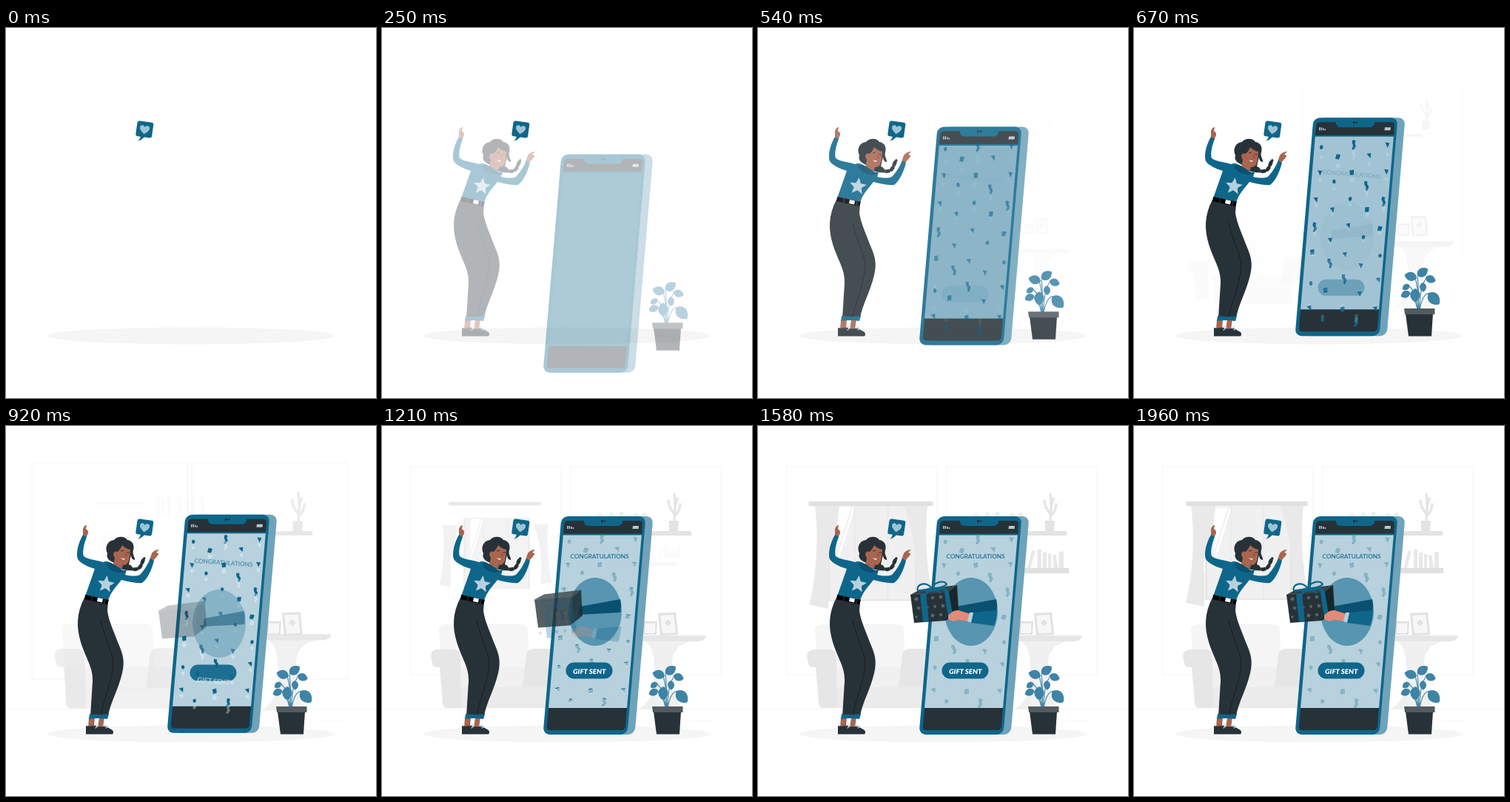
Recreate the animation shown at these times as an HTML page. Size 500x500 px, loop 2000 ms.

```html
<!DOCTYPE html>
<html lang="en">
<head>
<meta charset="utf-8">
<title>Gift sent</title>
<style>
html, body { margin: 0; width: 100%; height: 100%; overflow: hidden; background: #fff; }
svg { display: block; width: 100vw; height: 100vh; }
[data-pop], [data-rise] { transform-box: fill-box; transform-origin: center; }
text { font-family: Lato, Inter, sans-serif; text-anchor: middle; }
#darkBits { transform-origin: 0 100px; }
.teal { fill: #0e668b; }
.dark { fill: #263238; }
.skin { fill: #a8654f; }
.pale { fill: #b7d1dd; }
.line { fill: none; stroke-linecap: round; stroke-linejoin: round; }
</style>
</head>
<body>
<svg viewBox="0 0 500 500">
  <defs>
    <path id="leaf" d="M0 0C-9 -4 -7 -13 0 -17C7 -13 9 -4 0 0Z"/>
    <path id="star"/>
    <path id="dot" d="M-2.200 0A2.200 2.600 0 1 1 2.200 0A2.200 2.600 0 1 1 -2.200 0Z"/>
    <path id="tri" d="M-3 -2.500L3 -3L1.500 3.500Z"/>
    <path id="square" d="M-2.500 -3H3L2 3H-3Z"/>
    <path id="squiggle" d="M-2 -6L2 -5Q0 -2 3 1Q3 4 0 7L-2 5Q0 3 -1 1Q-4 -2 -2 -6Z"/>
  </defs>

  <!-- room: data-pop = start, fade delay -->
  <path d="M0 382.500H500M415 398.500H448" data-pop="6" stroke="#f2f2f2" stroke-width=".7"/>
  <rect data-pop="5.500" x="39" y="55" width="203" height="282" fill="none" stroke="#f5f5f5"/>
  <rect data-pop="5.500" x="255" y="55" width="203" height="282" fill="none" stroke="#f5f5f5"/>

  <g data-pop="20 0">
    <path d="M96 109H214V235H96Z" fill="#e6e6e6"/>
    <path d="M99 110H211V233H99Z" fill="#f0f0f0"/>
    <path d="M111 110H127L108 170V122ZM129 110H132L109 185V174Z" fill="#fff"/>
    <path d="M131 110V233M175 110V233" stroke="#e8e8e8" stroke-width="1.500"/>
  </g>
  <path data-pop="22 0" d="M77 108H109C108 150 91 165 95 200V244L70 239C79 205 83 150 77 108Z" fill="#e9e9e9"/>
  <path data-pop="22 0" d="M198 108H229C224 150 229 205 237 235L212 238C217 190 214 160 198 108Z" fill="#e9e9e9"/>
  <rect data-pop="20 0" x="70.500" y="102" width="164" height="6" rx="1" fill="#e0e0e0"/>

  <path data-pop="8" d="M77 276Q77 268 85 268H187Q197 268 197 277L200 355H84Z" fill="#f5f5f5"/>
  <g data-pop="8">
    <path d="M82 326H238V381H88Q83 381 82 375Z" fill="#f0f0f0"/>
    <path d="M84 353H238V381H88Z" fill="#ebebeb"/>
  </g>
  <path data-pop="8" d="M66 312Q66 302 76 302H95Q106 302 106 313L107 381H89Q83 381 82 375L78 326H73Q68 326 68 319Z" fill="#e6e6e6"/>
  <path data-pop="8" d="M195 310Q196 301 206 301H246V353H190Z" fill="#e6e6e6"/>

  <g data-pop="5">
    <path d="M354 290H423C400 294 393 304 391 325C390 358 396 376 412 383H345C362 376 369 358 368 325C367 306 365 296 354 290Z" fill="#f0f0f0"/>
    <path d="M338 283H438Q437 291 424 291H338Z" fill="#e6e6e6"/>
  </g>
  <g data-pop="5">
    <path d="M373 253L397 252L400 282L376 283ZM354 264H372L371 282H353Z" fill="#e0e0e0"/>
    <path d="M376 256L394.500 255L397 279.500L379 280.500ZM356 266.500H369.500L369 280H355Z" fill="#f7f7f7"/>
    <path d="M386 261L391 266L387 271L382 266Z" fill="#e3e3e3"/>
  </g>

  <path data-rise="20 8 -120 -30" fill="#ededed" d="M292 118H298V142H292ZM300 122H305V142H300ZM308 117H312V142H308ZM320 117L326 116L329 141L323 142ZM332 121H338V142H332ZM341 118H346V142H341ZM352 118L357 117L360 142H355Z"/>
  <rect data-pop="10 2" x="290" y="142" width="127" height="6" fill="#e3e3e3"/>
  <g data-pop="6.500">
    <path d="M388 128H401L400 142H388Z" fill="#e3e3e3"/>
    <path class="line" d="M395 128Q397 108 395 92M395 118Q388 112 387 101M395 122Q402 117 403 106M396 108Q399 103 399 98" stroke="#e6e6e6" stroke-width="3.500"/>
  </g>
  <g data-rise="26 8 0 -14">
    <rect data-pop="21 0" x="290" y="192" width="128" height="7" fill="#e0e0e0"/>
    <path data-pop="22 0" d="M365 190L371 168L375 169L369 192H365ZM378 167H383V192H378ZM385 171H390V192H385ZM392 173H396V192H392ZM398 175L402 174L405 192H399ZM406 170H412V192H406Z" fill="#e8e8e8"/>
  </g>

  <ellipse cx="250" cy="416" rx="194" ry="11.500" fill="#f5f5f5"/>

  <!-- phone -->
  <g id="phone">
    <g transform="matrix(1 0 -.0847 1 10.330 0)">
      <rect x="251" y="122" width="115.500" height="295" rx="9" fill="#6fa3ba"/>
      <rect class="teal" x="242.500" y="122" width="114" height="295" rx="9"/>
      <path class="dark" d="M247 145.500V133Q247 128 252 128H273Q275 135 280 135H320Q325 135 326 128H348Q353 128 353 133V145.500ZM247 381H353V406Q353 411 348 411H252Q247 411 247 406Z"/>
      <rect id="screen" class="pale" x="247" y="147.500" width="106" height="233.500"/>
    </g>
    <path class="dark" d="M296 127H299V130H296Z"/><circle class="dark" cx="301" cy="128.500" r="1.300"/>
    <path d="M250 135H251.500V139H250ZM252.500 135H254V139H252.500ZM255 136H256.500V139H255ZM257.500 137H259V139H257.500ZM339 135H347L346.500 139H338.500Z" fill="#b9c6cc"/>
  </g>
  <g id="darkBits" class="teal"><g id="bits"></g></g>
  <g data-rise="11 16 0 26"><use href="#bits" fill="#fff" fill-opacity=".5"/></g>

  <!-- data-rise = start, span, dx, dy, turn -->
  <text data-rise="12 14 0 30 14" class="teal" x="294" y="179" font-size="8.200" font-weight="500">CONGRATULATIONS</text>
  <rect data-rise="12 11 0 32" class="teal" x="248.500" y="319.500" width="63" height="22" rx="11"/>
  <g data-rise="16 12 0 26 14"><text transform="translate(280 334.800) skewX(-6)" font-size="9" font-weight="900" fill="#fff">GIFT SENT</text></g>
  <ellipse data-rise="15 14 0 32" cx="288" cy="251" rx="36" ry="46" fill="#5795b0"/>
  <path data-rise="15 14 0 32" d="M268 244L322 234Q324 243 322 252L266 255Z" fill="#0a5070"/>

  <!-- gift -->
  <g data-rise="18">
    <path d="M206 228L219 221L269 215L257 227Z" fill="#37444a"/>
    <path class="dark" d="M206 228L257 225L254 263L211 266Z"/>
    <path d="M257 225L269 215L271 250L254 263Z" fill="#1b2529"/>
  </g>
  <g data-rise="26 11">
    <g id="stars" fill="#5f6a6f"></g>
    <path class="teal" d="M219 227L227 226L231 264L223 265ZM253 217L258 224L263 255L257 259L252 225ZM226 221L252 217L256 220L228 225Z"/>
    <path class="line" d="M235 219C224 208 213 216 216 222C222 224 229 220 235 219C239 210 252 208 255 214C250 219 241 219 235 219M235 219L227 227M235 219L246 225" stroke="#0e668b" stroke-width="2.200"/>
  </g>
  <g data-rise="26 11">
    <path d="M257 256Q264 248 271 249L287 254L285 264L271 262Q261 266 257 260Z" fill="#e48a78"/>
    <path class="pale" d="M286 252H292L289 266L283 264Z"/>
    <path class="teal" d="M291 252L323 249Q323 260 319 270L288 266Z"/>
  </g>

  <!-- plant -->
  <g data-rise="1">
    <path class="line" d="M384 380Q385 350 383 336M386 380Q386 350 395 338M385 380Q384 350 380 338M383 380Q383 358 371 348M386 380Q391 357 399 359M383 380Q379 362 372 358" stroke="#3d84a6" stroke-width="1.100"/>
    <g fill="#3d84a6">
      <use href="#leaf" transform="translate(383 335) rotate(55)"/>
      <use href="#leaf" transform="translate(394 337) rotate(110) scale(.85)"/>
      <use href="#leaf" transform="translate(382 338) rotate(-75)"/>
      <use href="#leaf" transform="translate(372 347) rotate(235) scale(.65)"/>
      <use href="#leaf" transform="translate(390 344) rotate(175) scale(.75)"/>
      <use href="#leaf" transform="translate(380 352) rotate(180) scale(1.100)"/>
      <use href="#leaf" transform="translate(373 357) rotate(245) scale(.8)"/>
      <use href="#leaf" transform="translate(398 358) rotate(137) scale(1.250)"/>
    </g>
    <path class="dark" d="M367 386H404L402 416.500H371Z"/>
    <path d="M365 379H406.500V387H366Z" fill="#515b60"/>
  </g>

  <!-- woman -->
  <g id="woman">
    <path class="skin" d="M104 151L104 139Q106 134 109 134L108 139Q113 142 110 147L108 152ZM194 181L197 172Q201 167 207 167L203 171Q208 172 205 175L199 182ZM112 394H120L119 407H111ZM126 394H133L131 407H124Z"/>
    <path class="line" d="M166 192Q179 197 183 187T187 179" stroke="#263238" stroke-width="5" stroke-dasharray="3 4.500"/>
    <path class="line" d="M166 192Q179 197 183 187T187 179" stroke="#263238" stroke-width="3"/>
    <path class="dark" d="M137 172C133 164 137 155 146 154C151 148 161 149 164 154C171 155 174 161 172 168C170 173 175 178 174 181C170 181 169 177 169 174L166 187C174 190 172 197 164 195C153 194 150 189 146 185C139 182 135 178 137 172Z"/>
    <path class="skin" d="M147 178L145 188Q151 194 157 192L158 188Q166 188 167 178L168 167Q162 166 157 161Q154 168 150 170Q146 168 145 173Q145 176 147 178Z"/>
    <path d="M155 178Q158 180 161 179Q159 183 155 178Z" fill="#fff"/>
    <path class="line" d="M156 169L158 168M164 171L166 171" stroke="#263238" stroke-width="1.200"/>
    <path class="line" d="M161 171L163 175L161 175" stroke="#7d4637" stroke-width=".8"/>
    <path class="teal" d="M104 147L109 150C105 160 103 171 105 176C112 181 123 181 131 184Q138 181 146 188Q152 196 163 195L161 201C169 203 177 203 181 201C187 195 192 186 195 179L200 182C197 195 190 208 184 212C175 213 165 210 156 208C148 218 140 226 138 237L107 230L120 193C110 190 100 185 97 180C94 172 98 157 104 147Z"/>
    <path d="M135 187Q142 201 161 197Q152 191 146 187Q139 183 135 187Z" fill="#0a5070"/>
    <use href="#star" class="pale" transform="translate(135 214) rotate(8) scale(12)"/>
    <path class="dark" d="M106 232L138 238L137 250C139 264 146 278 151 292C158 308 161 317 157 334C151 358 141 374 138 392H114L117 345C118 326 108 315 101 292C95 272 95 253 106 232Z"/>
    <path class="line" d="M128 263C132 285 143 300 145 320C144 345 132 370 128 390" stroke="#1a2327" stroke-width="1.300"/>
    <path d="M107 228L139 235L137 241L106 234Z" fill="#000"/>
    <path d="M124 232L131 233.500L130 238.500L123 237Z" fill="#fff"/>
    <path d="M116 230V236M134 234L133 240" stroke="#37474f" stroke-width="1"/>
    <path class="teal" d="M113 389Q126 391 139 389L137 396Q125 394 112 396Z"/>
    <path class="dark" d="M108 405Q114 407 119 404L134 412L134 416.500H108ZM123 405Q129 408 133 405L144 411Q146 414 144 416.500H123Z"/>
    <path class="line" d="M119 405L123 403M121 408L125 405M133 406L136 404M135 408L138 406" stroke="#b7d1dd" stroke-width="1.300"/>
  </g>

  <!-- like bubble -->
  <g transform="translate(187.300 137) rotate(8)">
    <path class="teal" d="M-8 -10.500H8Q11 -10.500 11 -7.500V7.500Q11 10.500 8 10.500H1Q-2 15 -7 17Q-4 14 -4 10.500H-8Q-11 10.500 -11 7.500V-7.500Q-11 -10.500 -8 -10.500Z"/>
    <path d="M0 6.500C-4 3 -7 1 -6.500 -2.500C-6 -6 -1.500 -6 0 -3C1.500 -6 6 -6 6.500 -2.500C7 1 4 3 0 6.500Z" fill="#9fc3d3"/>
  </g>
</svg>
<script>
const $ = id => document.getElementById(id);
const clamp = v => Math.max(0, Math.min(1, v));
const FPS = 24, LOOP = 2000;

let seed = 7;
const jitter = size => {
  seed = seed * 16807 % 2147483647;
  return (seed / 2147483647 - .5) * size;
};
const grid = (cols, rows, cell) =>
  Array.from({ length: cols * rows }, (_, i) => cell(i % cols, Math.floor(i / cols))).join('');
const stamp = (shape, x, y, turn, size = 1) =>
  `<use href="#${shape}" transform="translate(${x} ${y}) rotate(${turn}) scale(${size})"/>`;

$('star').setAttribute('d', 'M' + Array.from({ length: 10 }, (_, i) => {
  const r = i % 2 ? .45 : 1, a = i * Math.PI / 5;
  return `${r * Math.sin(a)} ${-r * Math.cos(a)}`;
}).join('L') + 'Z');

$('stars').innerHTML = grid(4, 3, (c, r) =>
  stamp('star', 214 + 11 * c + 3 * (r % 2), 234 + 12 * r - c, jitter(40), 3.200 + jitter(1.500)));

// confetti: columns lean with the phone, odd ones sit half a row lower
const kinds = ['dot', 'tri', 'square', 'tri', 'squiggle'];
$('bits').innerHTML = grid(5, 7, (c, r) => {
  const y = 154 + 34 * r + 14 * (c % 2) + jitter(6);
  const x = 253 + 22.500 * c - .0847 * (y - 150) + jitter(4);
  return stamp(kinds[(c * 2 + r * 3) % 5], x, y, jitter(30));
});

// falls from 1 to 0 around u = 16, dips slightly below, then settles
const swing = u => u < 0 ? 1 : Math.exp(-((u / 17) ** 4)) * Math.cos(u / 10);

const pose = (el, opacity, transform = 'none') => {
  el.style.opacity = opacity;
  el.style.transform = transform;
};
const parts = name => [...document.querySelectorAll(`[data-${name}]`)]
  .map(el => [el, ...el.dataset[name].split(' ').map(Number)]);
const pops = parts('pop'), rises = parts('rise');

function draw(k) {
  for (const [el, start, delay = 6] of pops) {
    const age = k - start;
    pose(el, clamp((age - delay) / 12), `scale(${1 - .6 * swing(age * 1.200)})`);
  }
  for (const [el, start, span = 14, dx = 0, dy = 30, turn = 0] of rises) {
    const p = clamp((k - start) / span), left = 1 - p;
    pose(el, p, `translate(${dx * left}px, ${dy * left}px) rotate(${Math.min(5, turn * left)}deg)`);
  }
  const fade = clamp((k - 1) / 14);
  pose($('woman'), fade);
  pose($('phone'), fade, `translateY(${60 * swing(k)}px)`);
  pose($('screen'), clamp((k - 5) / 12.500));
  pose($('darkBits'), clamp((k - 9) / 7), `scaleY(${1 + .17 * swing(k - 6)})`);
}

const begin = performance.now();
function tick() {
  const t = (performance.now() - begin) % LOOP;
  draw(Math.floor((t + 5) * FPS / 1000) % 48);
  requestAnimationFrame(tick);
}
tick();
</script>
</body>
</html>
```
